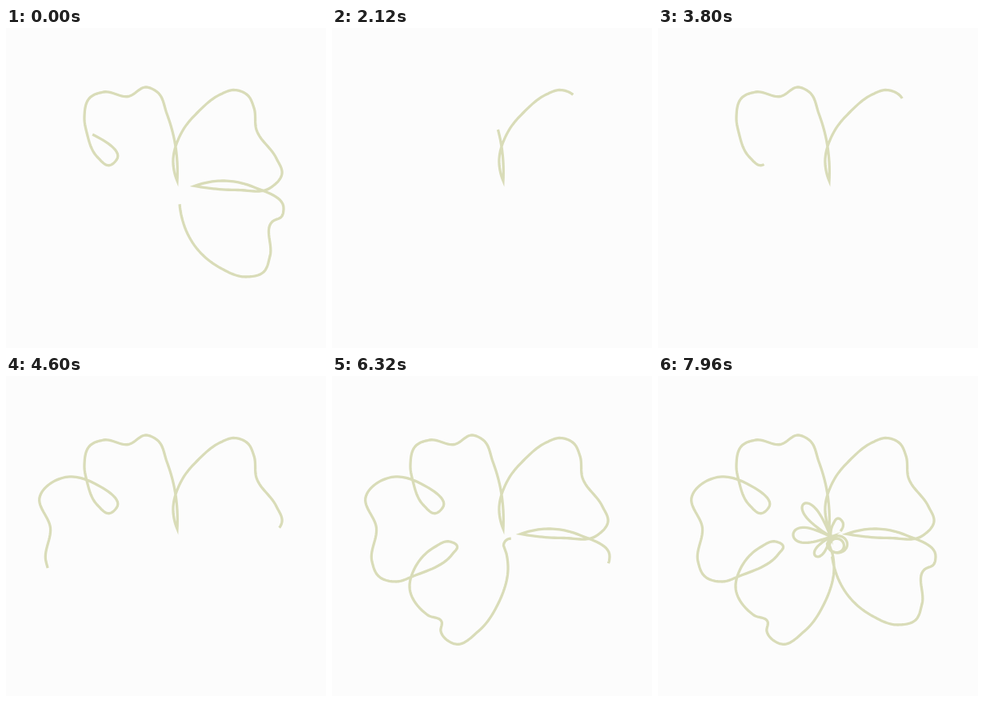
Animation, 400 px wide and 400 px high, one loop 8 s. Source, as an HTML page:

```html
<!DOCTYPE html>
<html lang="en">
<head>
<meta charset="utf-8">
<title>Flower line</title>
<style>
html, body { margin: 0; width: 100%; height: 100%; overflow: hidden; background: #fcfcfc; }
svg { display: block; width: 100%; height: 100%; }
path { fill: none; stroke: #d9dcb8; stroke-width: 3.3; stroke-linejoin: miter; stroke-miterlimit: 10; }
</style>
</head>
<body>
<svg viewBox="0 0 400 400"><path id="line"/></svg>
<script>
const LOOP = 8000;
const HUB = [216, 201];
const SEED = [108, 133];

const mix = (a, b, k) => a + (b - a) * k;
const distance = (a, b) => Math.hypot(b[0] - a[0], b[1] - a[1]);
const sample = (steps, fn) => Array.from({ length: steps + 1 }, (_, i) => fn(i / steps));

// Smooth curve through a few "x,y" points; the ends bend like a parabola.
function spline(text) {
  const knots = text.split(' ').map(pair => pair.split(',').map(Number));
  const last = knots.length - 1;
  const spans = knots.slice(1).map((p, i) => distance(knots[i], p));
  const slope = (i, k) => (knots[i + 1][k] - knots[i][k]) / spans[i];
  const unit = v => v.map(n => n / Math.hypot(...v));
  const inner = i => unit([0, 1].map(k => slope(i - 1, k) * spans[i] + slope(i, k) * spans[i - 1]));
  const outer = (i, near) => unit([0, 1].map(k => 2 * slope(i, k) - near[k]));
  const tangents = knots.map((_, i) =>
    i === 0 ? outer(0, inner(1)) : i === last ? outer(last - 1, inner(last - 1)) : inner(i));

  return spans.flatMap((span, i) => sample(14, f => [0, 1].map(k => {
    const a = knots[i][k], b = knots[i + 1][k];
    const p = a + tangents[i][k] * span / 3, q = b - tangents[i + 1][k] * span / 3;
    const g = 1 - f;
    return g * g * g * a + 3 * g * g * f * p + 3 * g * f * f * q + f * f * f * b;
  })));
}

// A drop-shaped loop from the hub out to its tip and back.
function leaf(tip, halfWidth) {
  const length = distance(HUB, tip);
  const [ux, uy] = [0, 1].map(k => (tip[k] - HUB[k]) / length);
  return sample(40, f => {
    const along = length * Math.sin(Math.PI * f);
    const across = halfWidth * Math.sin(2 * Math.PI * f);
    return [HUB[0] + ux * along - uy * across, HUB[1] + uy * along + ux * across];
  });
}

// Two turns that tighten from the outer ring to the inner one.
function rings() {
  return sample(80, f => {
    const k = f * f * (3 - 2 * f), angle = Math.PI * (1 - 4 * f);
    return [mix(224.5, 223, k) + mix(13, 8.5, k) * Math.cos(angle),
            mix(209.5, 212, k) + mix(11.5, 8.5, k) * Math.sin(angle)];
  });
}

const bottomPetal = '218,222 220,238 207,286 183,319 154,335 136,319 137,307 120,299';
const leftPetal = '97,264 103,241 128,214 147,207 156.5,213 151,222 102,250 80,257 58,250 50,232 55.5,190 42.5,150 72,127';
const topPetal = '108,133 138,165 130,171.5 114,161 101,131 98,112 105,87 122,80 153,85.5 176,74 189,80 201,107 210.5,140 214,191';
const rightPetal = '214,191 209,170 221,128 240,105 268,83 285,77.5 302,84 310,100 313,127 338,163 345,182 330,200 290,202.5 236,197.5';
const lowPetal = '236,197.5 270,191 310,199 347,226 345,235 333,242 330,285 322,305 300,311 268,300 238,275 217,220';

const points = [
  ...spline('228,194 231,183 225,178 219,185 216,201'),
  ...leaf([182, 160], 8),
  ...leaf([169, 198], 9.5),
  ...leaf([197, 225], 5.5),
  ...rings(),
  ...spline([bottomPetal, leftPetal, topPetal].join(' ')),
  ...spline(rightPetal),
  ...spline(lowPetal)
].filter((p, i, all) => !i || distance(p, all[i - 1]) > 0.01);

let total = 0;
const lengths = points.map((p, i) => total += i ? distance(points[i - 1], p) : 0);
const half = total - lengths[points.findIndex(p => distance(p, SEED) < 0.1)];

const line = document.getElementById('line');
line.setAttribute('d', 'M' + points.join('L'));

// One end runs forward over half the line while the other runs back over all of it.
function draw(u) {
  const forward = total - half * (1 - u);
  const backward = Math.max(0, total - 2 * half * u);
  const from = Math.min(forward, backward);
  line.style.strokeDasharray = `0 ${from} ${Math.abs(forward - backward)} 9999`;
}

const start = performance.now();
function frame() {
  draw((performance.now() - start) % LOOP / LOOP);
  requestAnimationFrame(frame);
}
frame();
</script>
</body>
</html>
```
